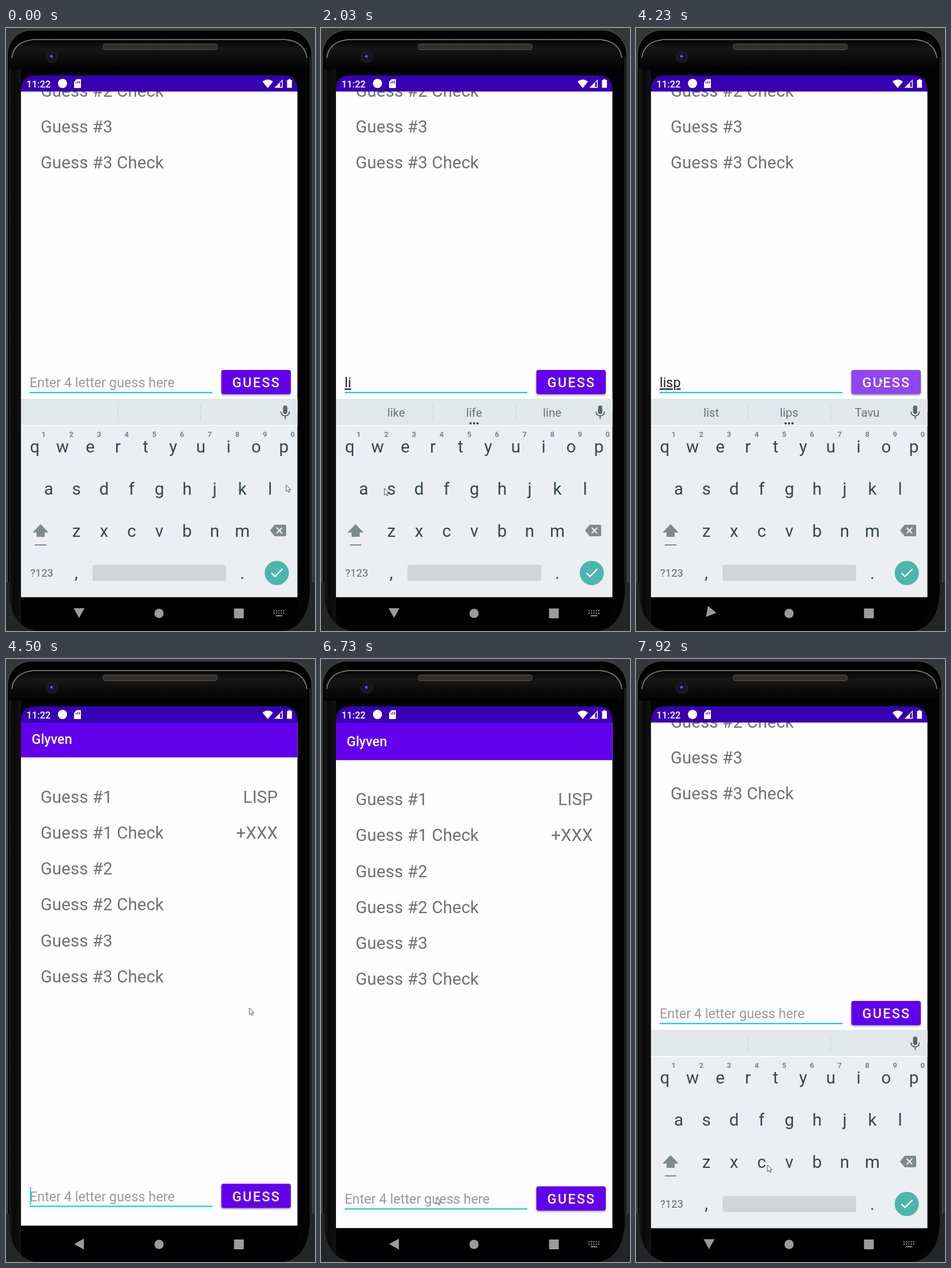
Write an HTML page that moves like this. It is 536 px wide and 1044 px high and loops after 8 s.

```html
<!DOCTYPE html>
<html lang="en">
<head>
<meta charset="utf-8">
<title>Word guessing app</title>
<style>
  html, body { margin: 0; width: 100%; height: 100%; overflow: hidden; background: #2d2e2f; }
  svg { display: block; width: 536px; height: 1044px; }
  text { font-family: Roboto, sans-serif; white-space: pre; }
  .mid { text-anchor: middle; }
  .rows { font-size: 29.2px; letter-spacing: .2px; fill: #717171; }
  .rows .end { text-anchor: end; }
  .field { font-size: 23.33px; }
  #typed { fill: #212121; text-decoration: underline; text-decoration-skip-ink: none; }
  .medium { font-size: 23.33px; font-weight: 500; fill: #fff; }
  .key { font-size: 29.5px; fill: #37474f; }
  .digit { font-size: 13px; font-weight: 700; fill: #78848a; }
  .sug { font-size: 20.4px; fill: #66757c; }
</style>
</head>
<body>
<svg viewBox="0 0 536 1044">
  <defs>
    <linearGradient id="side">
      <stop offset="0" stop-color="#1c1c1c"/><stop offset=".4" stop-color="#080808"/><stop offset="1" stop-color="#131313"/>
    </linearGradient>
    <linearGradient id="top" x2="0" y2="1">
      <stop offset="0" stop-color="#050505"/><stop offset=".3" stop-color="#161616"/><stop offset="1" stop-color="#020202"/>
    </linearGradient>
    <pattern id="grille" width="3" height="3" patternUnits="userSpaceOnUse">
      <rect width="3" height="3" fill="#292823"/><rect width="1.5" height="1.5" fill="#48463e"/>
    </pattern>
    <clipPath id="appClip"><rect x="26" y="109.5" width="479.5" height="876"/></clipPath>
    <filter id="shadow" x="-20%" y="-20%" width="140%" height="150%">
      <feDropShadow dx="0" dy="2" stdDeviation="1.5" flood-opacity=".35"/>
    </filter>
  </defs>

  <!-- phone body -->
  <rect width="536" height="1044" fill="#363738"/>
  <rect x="2.5" y="3.5" width="528" height="1075" rx="42" fill="#030303" stroke="#59595a"/>
  <rect x="5" y="70" width="21" height="974" fill="url(#side)"/>
  <path d="M6 72V54Q8 22 46 20H486Q522 22 524 54V72Z" fill="url(#top)"/>
  <path d="M10 52Q14 23 48 20H484Q518 23 522 52" fill="none" stroke="#8c8c8e" stroke-width="1.4"/>
  <path d="M527.5 50V1044" stroke="#484949"/>
  <path d="M0 960V1044H52Q8 1036 5 976V960Z" fill="#242526"/>
  <path d="M536 960V1044H482Q524 1036 527 976V960Z" fill="#242526"/>
  <path d="M26 80H505.500V1005Q503 1036 470 1043H62Q29 1036 26 1005Z"/>
  <rect x="168.500" y="27.500" width="198" height="10" rx="4" fill="url(#grille)" stroke="#55544f"/>
  <circle cx="79.500" cy="50" r="10" fill="#17171c" stroke="#29292c"/>
  <circle cx="79.500" cy="50" r="5.500" fill="#11133b"/>
  <circle cx="79" cy="49" r="2.600" fill="#3f4a9c"/>
  <circle cx="78.500" cy="48.500" r="1" fill="#aab4ef"/>

  <!-- app -->
  <g clip-path="url(#appClip)">
    <g id="content">
      <rect x="26" y="109" width="480" height="876.500" fill="#fefefe"/>
      <rect x="26" y="109" width="480" height="66" fill="#6200ee"/>
      <rect x="26" y="175" width="480" height="1" fill="#e4e0ea"/>
      <text class="medium" x="44.500" y="151">Glyven</text>
      <g class="rows" id="rows"></g>
      <text class="field" id="hint" x="41" y="943" fill="#9a9a9a">Enter 4 letter guess here</text>
      <text class="field" id="typed" x="41" y="943"></text>
      <rect x="41" y="951" width="317" height="2.300" fill="#1dd3c7"/>
      <rect id="caret" y="918" width="2" height="31" fill="#03dac5"/>
      <rect id="button" x="373.500" y="913" width="120.500" height="42" rx="4" filter="url(#shadow)"/>
      <text class="medium" x="392.500" y="943" letter-spacing="2.300">GUESS</text>
    </g>
    <g id="keyboard">
      <rect x="26" y="642" width="480" height="344" fill="#ebeff2"/>
      <rect x="26" y="642" width="480" height="45.500" fill="#e2e7ea"/>
      <path d="M26 688H506" stroke="#fafbfc" stroke-width="1.500"/>
      <path d="M194.500 652V680M337.500 652V680" stroke="#cdd3d6"/>
      <g id="suggestions"></g>
      <g id="dots" fill="#37474f"><circle cx="259.500" cy="684.500" r="1.900"/><circle cx="265.500" cy="684.500" r="1.900"/><circle cx="271.500" cy="684.500" r="1.900"/></g>
      <g fill="none" stroke="#59686f" stroke-width="2">
        <rect x="481.500" y="654.500" width="5.500" height="13" rx="2.750" fill="#59686f"/>
        <path d="M477 664Q477.500 671.500 484.300 671.500T491.500 664M484.300 671.500V677"/>
      </g>
      <g id="keys"></g>
      <path d="M60 859L74 873.500H67V881H53V873.500H46Z" fill="#7f8a8f"/>
      <path d="M50 895H70" stroke="#7f8a8f" stroke-width="2"/>
      <path d="M466 860H484Q486 860 486 862V878Q486 880 484 880H466L458 870Z" fill="#7f8a8f"/>
      <path d="M469.500 865L479 875M479 865L469.500 875" stroke="#ebeff2" stroke-width="2.200"/>
      <text x="42" y="950" font-size="18.500" fill="#5b6a71">?123</text>
      <rect x="150" y="929.500" width="232" height="28" rx="4" fill="#d0d5d8"/>
      <circle cx="469.700" cy="943.500" r="21" fill="#4db6ac"/>
      <path d="M460.500 943.500L466.500 949.500L479.500 936.500" fill="none" stroke="#fff" stroke-width="2.400"/>
      <g id="popup">
        <rect x="-28.500" y="-111" width="57" height="133" rx="3" fill="#cfd6d9" filter="url(#shadow)"/>
        <text class="mid" id="popupLetter" y="-60" font-size="44" fill="#37474f"></text>
        <g id="more" fill="#8d999e"><circle cx="13.500" cy="-47" r="1.500"/><circle cx="18.500" cy="-47" r="1.500"/><circle cx="23.500" cy="-47" r="1.500"/></g>
      </g>
    </g>
  </g>

  <!-- status bar -->
  <path d="M26 110V106Q27 82 52 82H480Q505 82 505.500 106V110Z" fill="#3700b3"/>
  <g fill="#fff">
    <text x="35.500" y="102.500" font-size="16.500" font-weight="500">11:22</text>
    <circle cx="98" cy="96" r="8"/>
    <path d="M122.500 88.500H129Q130 88.500 130 89.500V103Q130 104 129 104H119Q118 104 118 103V93.500Z"/>
    <path d="M121.500 93V96M124.500 92V96M127.500 92V96" stroke="#3700b3" stroke-width="1.300"/>
    <path d="M445 93Q454 85.500 463 93L454 104Z"/>
    <path d="M480 89V103.500H465.500Z"/>
    <path d="M475.500 95V102H478.500V92Z" fill="#3700b3"/>
    <path d="M490 90V88.500H493.500V90H496V103.500H487.500V90Z"/>
  </g>

  <!-- navigation bar -->
  <g fill="#9b9b9b">
    <path id="back" d="M-9.500 -8.500H9.500L0 8.500Z"/>
    <circle cx="265.500" cy="1013.500" r="8"/>
    <rect x="395.500" y="1005" width="17" height="17" rx="1"/>
    <g id="kbIcon" stroke="#9b9b9b" stroke-width="2" stroke-dasharray="2 2.200">
      <path d="M464 1009H483M464 1013H483"/><path d="M468 1017.500H479" stroke-dasharray="none"/>
    </g>
  </g>

  <path id="mouse" d="M0 0V11.500L2.600 9.200L4.400 13L6.300 12.100L4.600 8.400H8Z" fill="#fff" stroke="#3a3a3a" stroke-width=".9"/>
</svg>
<script>
const $ = id => document.getElementById(id);

function addText(parent, className, x, y, content) {
  const node = document.createElementNS("http://www.w3.org/2000/svg", "text");
  node.setAttribute("class", className);
  node.setAttribute("x", x);
  node.setAttribute("y", y);
  node.textContent = content;
  parent.append(node);
  return node;
}

for (let i = 0; i < 6; i++) {
  const label = `Guess #${(i >> 1) + 1}${i % 2 ? " Check" : ""}`;
  addText($("rows"), "", 60, 253 + 62.25 * i, label);
}
const answers = ["LISP", "+XXX"].map((s, i) => addText($("rows"), "end", 471.5, 253 + 62.25 * i, s));

const keyRows = [["qwertyuiop", 50], ["asdfghjkl", 74], ["zxcvbnm", 122]];
const keyAt = {};
keyRows.forEach(([letters, left], row) => [...letters].forEach((letter, i) => {
  const x = left + 48 * i, y = 724 + 73 * row;
  keyAt[letter] = [x, y];
  addText($("keys"), "key mid", x, y + 10.5, letter);
  if (row === 0) addText($("keys"), "digit mid", x + 15.3, 708, (i + 1) % 10);
}));
addText($("keys"), "key mid", 122, 953, ",");
addText($("keys"), "key mid", 410, 953.5, ".");
const suggestions = [130.5, 265.5, 401].map(x => addText($("suggestions"), "sug mid", x, 673, ""));

// Each step lists only what changes from the one before.
const steps = [
  [0, { mouse: [486, 791], caret: 0, text: "", words: "", popup: "", pan: 321, kb: 0, turn: 0, icon: 1, button: "#6200ee", checked: 0 }],
  [150, { mouse: [458, 790], caret: 1 }],
  [490, { popup: "l" }],
  [650, { text: "l", words: "lol l love" }],
  [810, { popup: "", mouse: [452, 782], caret: 0 }],
  [980, { mouse: [422, 752] }],
  [1150, { mouse: [386, 725], caret: 1 }],
  [1340, { popup: "i" }],
  [1490, { text: "li" }],
  [1640, { popup: "", words: "like life line", mouse: [372, 731] }],
  [1770, { mouse: [262, 764] }],
  [1900, { mouse: [148, 791] }],
  [2030, { mouse: [110, 797], caret: 0 }],
  [2320, { popup: "s" }],
  [2490, { text: "lis", words: "Los Li's li's", caret: 1 }],
  [2660, { popup: "", mouse: [150, 792] }],
  [2830, { mouse: [310, 757] }],
  [3010, { mouse: [468, 726], caret: 0 }],
  [3180, { popup: "p", mouse: [480, 723] }],
  [3330, { text: "lisp" }],
  [3480, { popup: "", words: "list lips Tavu", mouse: [474, 708], caret: 1 }],
  [3630, { mouse: [441, 640] }],
  [3780, { mouse: [422, 604] }],
  [4080, { button: "#7a25f0", caret: 0 }],
  [4230, { button: "#9045f2", turn: 40, icon: 0 }],
  [4350, { button: "#6200ee", text: "", checked: 1, kb: 350, pan: 110, turn: 80, caret: 1 }],
  [4500, { pan: 4.5, turn: 90 }],
  [4710, { pan: 0 }],
  [5030, { caret: 0, mouse: [420, 622] }],
  [5180, { mouse: [394, 710] }],
  [5330, { mouse: [350, 822] }],
  [5480, { mouse: [304, 906] }],
  [5630, { mouse: [283, 930], caret: 1 }],
  [6190, { mouse: [236, 932], caret: 0 }],
  [6310, { mouse: [200, 932.5] }],
  [6580, { caret: 1 }],
  [6730, { caret: 0, icon: 1 }],
  [7020, { words: "", kb: 110, pan: 160, turn: 50 }],
  [7180, { kb: 8, pan: 312, turn: 6 }],
  [7330, { kb: 0, pan: 321, turn: 0, caret: 1 }],
  [7650, { mouse: [204, 924] }],
  [7790, { mouse: [217, 899] }],
  [7920, { mouse: [228, 876], caret: 0 }]
];
let merged = {};
const states = steps.map(([time, change]) => ({ time, ...(merged = { ...merged, ...change }) }));

const move = (id, x, y, extra = "") => $(id).setAttribute("transform", `translate(${x} ${y})${extra}`);
const show = (node, visible) => node.style.display = visible ? "" : "none";

function draw(s) {
  move("mouse", ...s.mouse);
  move("content", 0, -s.pan);
  move("keyboard", 0, s.kb);
  move("back", 126.7, 1013, ` rotate(${s.turn})`);
  show($("kbIcon"), s.icon);
  show($("hint"), !s.text);
  show($("caret"), s.caret);
  answers.forEach(node => show(node, s.checked));
  $("typed").textContent = s.text;
  const textWidth = s.text ? $("typed").getComputedTextLength() : 0;
  $("caret").setAttribute("x", 41.5 + textWidth);
  $("button").setAttribute("fill", s.button);
  const words = s.words.split(" ");
  suggestions.forEach((node, i) => node.textContent = words[i] || "");
  show($("dots"), s.words);
  show($("popup"), s.popup);
  if (s.popup) {
    const [x, y] = keyAt[s.popup];
    move("popup", Math.min(x, 473.3), y);
    $("popupLetter").textContent = s.popup;
    show($("more"), s.popup !== "l");
  }
}

let current;
function tick() {
  const time = performance.now() % 8000;
  const state = states.findLast(s => s.time <= time);
  if (state !== current) draw(current = state);
  requestAnimationFrame(tick);
}
tick();
</script>
</body>
</html>
```
